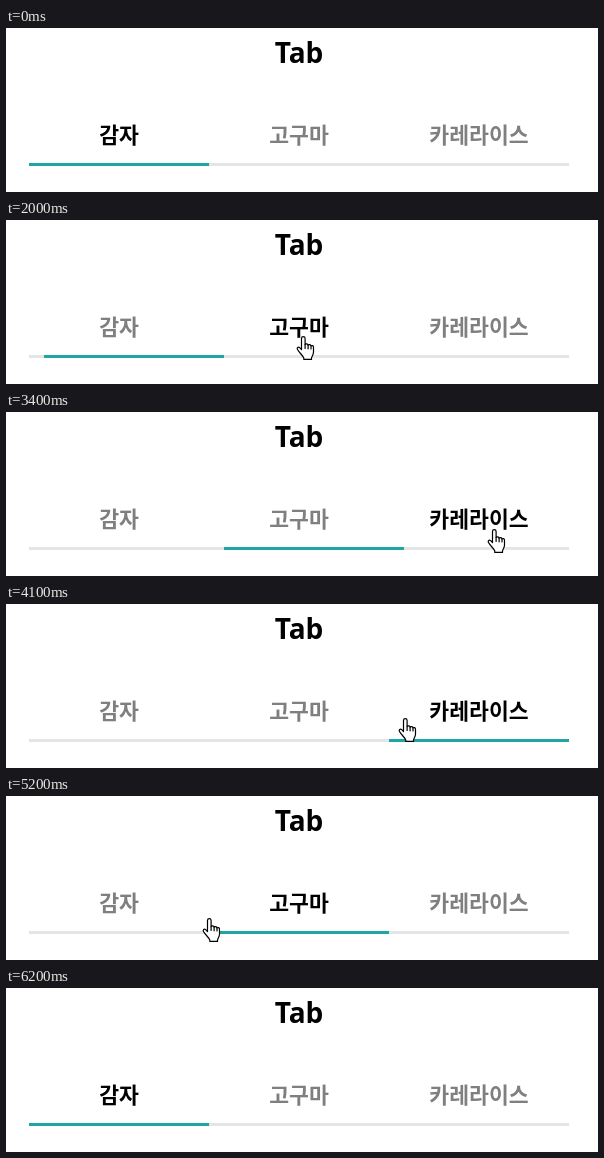
Write an HTML page that moves like this. It is 592 px wide and 164 px high and loops after 7.2 s.

```html
<!DOCTYPE html>
<html lang="ko">
<head>
<meta charset="utf-8">
<title>Tab</title>
<style>
  html, body { margin: 0; width: 100%; height: 100%; overflow: hidden; background: #fff; }
  svg { display: block; width: 592px; height: 164px; }
  text { text-anchor: middle; font-weight: 700; }
  .title { font-size: 28px; font-family: "Open Sans", "Noto Sans", sans-serif; }
  .tab { font-size: 21.6px; font-family: "Noto Sans CJK KR", "Noto Sans CJK", sans-serif; }
</style>
</head>
<body>
<svg viewBox="0 0 592 164">
  <text class="title" x="293" y="35">Tab</text>
  <text class="tab" x="113" y="115">감자</text>
  <text class="tab" x="293" y="115">고구마</text>
  <text class="tab" x="473" y="115">카레라이스</text>
  <rect x="23" y="135" width="540" height="3" fill="#e5e5e5"/>
  <rect id="bar" y="135" width="180" height="3" fill="#1fa5a8"/>
  <g id="hand" fill="#fff" stroke="#000" stroke-width="1.2" stroke-linejoin="round" stroke-linecap="round">
    <path d="M5.5 13.5V2.5a1.8 1.8 0 0 1 3.6 0V8.6c.5-1 2.7-.9 3 .5c.6-.8 2.6-.6 2.9 .8c.7-.7 2.5-.4 2.5 1.3V16c0 3-1.7 4-2 6.2V23.4H7.8V22C6.500 19 3.500 17 1.500 13.500C.5 11.800 2.200 10.400 3.700 11.600Z"/>
    <path d="M9.100 8.600V12.500M12.100 9.100V12.800M15 9.900V13" fill="none"/>
  </g>
</svg>
<script>
const LOOP = 7200, STEP = 100, SLIDE = 200, LAG = 50 / 3;
const bar = document.getElementById("bar");
const hand = document.getElementById("hand");
const tabs = document.querySelectorAll(".tab");

const clicks = [
  { at: 0, tab: 0 }, { at: 2000, tab: 1 }, { at: 3400, tab: 2 },
  { at: 4800, tab: 1 }, { at: 5800, tab: 0 }
];

// Each run: start time, then one [x, y] per step; the last position is held.
const moves = [
  { at: 600, path: [[576, 131], [481, 131], [386, 129], [319, 126], [302, 122], [293, 118], [290, 116]] },
  { at: 2700, path: [[325, 117], [432, 117], [481, 117]] },
  { at: 4000, path: [[458, 115], [392, 114], [332, 117], [312, 118]] },
  { at: 5000, path: [[300, 119], [253, 121], [196, 122], [150, 130], [126, 122], [121, 116]] },
  { at: 6000, path: [[119, 129], [112, 149]] }
];

const latest = (list, t) => list.filter(item => item.at <= t).pop();

function handAt(t) {
  const move = latest(moves, t);
  if (!move || t >= 6200) return null;
  return move.path[Math.min((t - move.at) / STEP, move.path.length - 1)];
}

function render(time) {
  const t = Math.floor((time % LOOP) / STEP) * STEP;
  const click = latest(clicks, t);
  const from = clicks[Math.max(0, clicks.indexOf(click) - 1)].tab;
  const progress = Math.min(1, (t - click.at + LAG) / SLIDE);
  bar.setAttribute("x", 23 + 180 * (from + (click.tab - from) * progress));
  tabs.forEach((tab, i) => tab.setAttribute("fill", i === click.tab ? "#000" : "#7f7f7f"));

  const point = handAt(t);
  hand.setAttribute("visibility", point ? "visible" : "hidden");
  if (point) hand.setAttribute("transform", `translate(${point})`);
}

const start = performance.now();
function tick() {
  render(performance.now() - start);
  requestAnimationFrame(tick);
}
tick();
</script>
</body>
</html>
```
